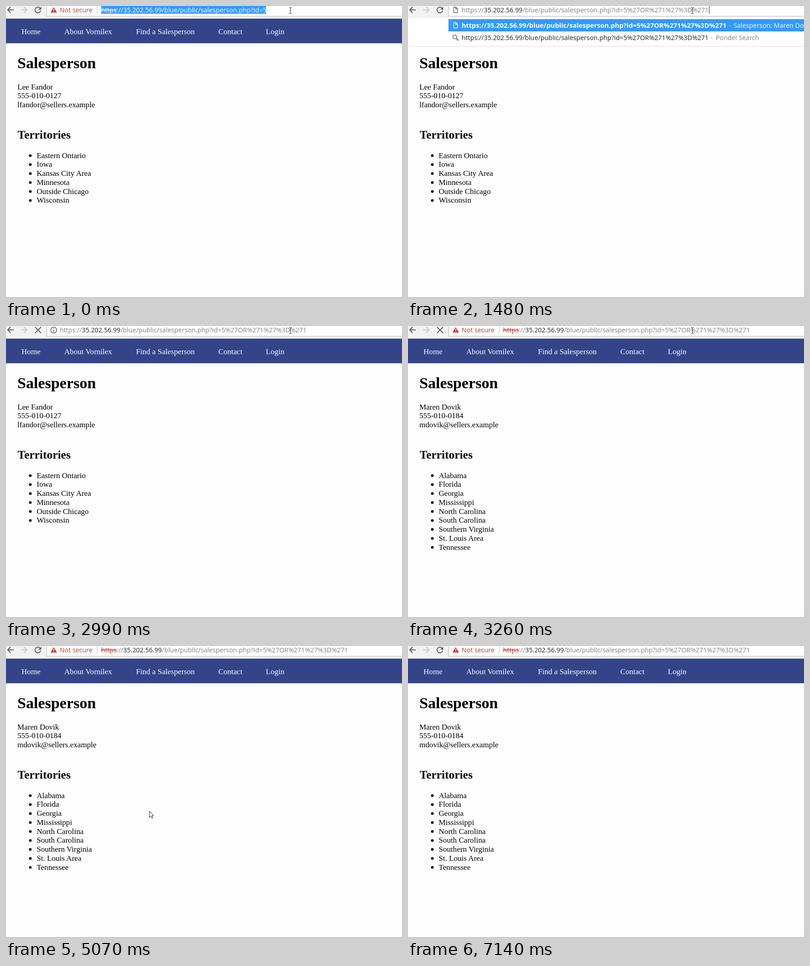
Recreate the animation shown at these times as an HTML page. Size 871 by 643 pixels, loop 7410 ms.

```html
<!DOCTYPE html>
<html lang="en">
<head>
<meta charset="utf-8">
<title>Salesperson page</title>
<style>
html, body { margin: 0; width: 100%; height: 100%; overflow: hidden; background: #fdfdfd; }
svg { display: block; width: 871px; height: 643px; }
text { white-space: pre; }
.ui { font: 14.3px "Open Sans", "Noto Sans", sans-serif; }
.page { font: 17.1px "Liberation Serif", "Noto Serif", serif; }
.bold { font-weight: bold; }
.muted { fill: #808080; }
.dark { fill: #222; }
.danger { fill: #c53929; }
.strike { text-decoration: line-through; }
.line { fill: none; stroke-width: 2; }
</style>
</head>
<body>
<svg id="stage" viewBox="0 0 871 643"></svg>
<script>
const LOOP = 7410;
const LINE = 19.75;
const HOST = "35.202.56.99";
const PATH = "/blue/public/salesperson.php?id=5";
const INJECTED = PATH + "%27OR%271%27%3D%271";

// Pointer stops: time, x, y. The pointer jumps from one to the next.
const STOPS = [
  [4120, 345, 367], [4250, 225, 467], [4400, 185, 300], [4530, 151, 122],
  [4680, 282, 260], [4800, 0, 371], [4950, 150, 470], [5070, 315, 363],
  [5190, 170, 410], [5310, 59, 369], [5460, 586, 556], [5610, 675, 630],
  [6020, 559, 575], [6160, 552, 560], [6290, 786, 522], [6440, 846, 560],
  [6720, 844, 618], [6870, 844, 629], [6990, 844, 639]
];

const rect = (x, y, w, h, fill) =>
  `<rect x="${x}" y="${y}" width="${w}" height="${h}" fill="${fill}"/>`;
const text = (x, y, content, cls = "", attrs = "") =>
  `<text x="${x}" y="${y}" class="${cls}" ${attrs}>${content}</text>`;
const span = (cls, content) => `<tspan class="${cls}">${content}</tspan>`;
const path = (d, color, attrs = "") =>
  `<path class="line" d="${d}" stroke="${color}" ${attrs}/>`;
// Content visible only in the listed time spans, e.g. "0-120 670-1200".
const during = (spans, ...content) =>
  `<g data-during="${spans}">${content.join("")}</g>`;

const url = (x, route, scheme = "muted") => text(x, 14,
  span(scheme, "https") + span("muted", "://") + span("dark", HOST) + span("muted", route), "ui");

const fileIcon = (y, color) =>
  path(`M100.5 ${y + .5}h5l3.500 3.500v8.500h-8.500zM105 ${y + .5}v4h4`, color, 'style="stroke-width:1.3"');

const notSecure =
  '<path d="M105 2.500L112 14.500H98Z" fill="#c53929"/>' +
  rect(104.2, 6.5, 1.6, 4, "#fff") + rect(104.2, 11.5, 1.6, 1.6, "#fff") +
  text(118, 14, "Not secure", "ui danger") + rect(200, 0, 1, 17, "#c4c4c4");

const reload =
  path("M75 4.800A6.300 6.300 0 1 0 76.300 10", "#5a5a5a") +
  '<path d="M77.500 1.500V8H71Z" fill="#5a5a5a"/>';

const toolbar =
  rect(0, 0, 871, 27, "#f2f2f2") + rect(0, 27, 871, 1, "#c9ccd4") +
  rect(89, 0, 782, 23, "#b5b5b5") + rect(90, 0, 781, 22, "#fff") +
  path("M17 8.500H4M10 2L3.800 8.500L10 15", "#5a5a5a") +
  path("M33 8.500H46M40 2L46.200 8.500L40 15", "#c8c8c8");

const nav = rect(0, 28, 871, 54, "#334488") + [
  [34, "Home"], [128, "About Vornilex"], [286, "Find a Salesperson"],
  [467, "Contact"], [571.5, "Login"]
].map(([x, label]) => text(x, 62, label, "page", 'fill="#fff"')).join("");

const person = (details, territories) =>
  details.map((s, i) => text(25, 183.7 + i * LINE, s, "page")).join("") +
  territories.map((s, i) =>
    `<circle cx="53.5" cy="${329.5 + i * LINE}" r="2.900"/>` +
    text(67.5, 334.5 + i * LINE, s, "page")).join("");

const suggestions =
  rect(0, 24, 871, 64, "#fff") + rect(0, 24, 89, 1, "#e2e2e2") +
  rect(0, 88, 871, 1, "#e6e6e6") + rect(0, 89, 871, 1, "#f4f4f4") +
  rect(89, 29, 782, 27, "#3399ff") + fileIcon(36, "#fff") +
  text(118, 48, "https://" + HOST + INJECTED, "ui bold", 'fill="#fff" style="font-size:14.6px"') +
  text(706, 48, "-", "ui", 'fill="#b9dcff"') +
  text(716, 48, "Salesperson: Maren Dovik", "ui", 'fill="#fff"') +
  path("M106.500 71.500L111 76", "#5a5a5a") +
  '<circle class="line" cx="103" cy="68" r="4.300" stroke="#5a5a5a" style="stroke-width:1.5"/>' +
  text(118, 74.5, "https://" + HOST + INJECTED, "ui dark") +
  text(666, 74.5, "-", "ui muted") + text(677, 74.5, "Pondel Search", "ui muted");

const infoIcon =
  '<circle class="line" cx="105" cy="9" r="6.500" stroke="#5a5a5a" style="stroke-width:1.5"/>' +
  rect(104.2, 8, 1.6, 5, "#5a5a5a") + rect(104.2, 5, 1.6, 1.7, "#5a5a5a");

const stage = document.getElementById("stage");
stage.innerHTML = [
  rect(0, 0, 871, 643, "#fdfdfd"),
  toolbar,
  nav,
  text(25, 137, "Salesperson", "page bold", 'style="font-size:34.2px"'),
  text(25.5, 291.5, "Territories", "page bold", 'style="font-size:25.5px"'),
  during("0-3260", person(
    ["Lee Fandor", "555-010-0127", "lfandor@sellers.example"],
    ["Eastern Ontario", "Iowa", "Kansas City Area", "Minnesota", "Outside Chicago", "Wisconsin"])),
  during("3260-7410", person(
    ["Maren Dovik", "555-010-0184", "mdovik@sellers.example"],
    ["Alabama", "Florida", "Georgia", "Mississippi", "North Carolina", "South Carolina",
      "Southern Virginia", "St. Louis Area", "Tennessee"])),
  rect(0, 642, 871, 1, "#888"),

  during("0-2990 3380-7410", reload),
  during("2990-3380", path("M64 2.500L77 15.500M77 2.500L64 15.500", "#5a5a5a")),
  during("0-1480 3260-7410", notSecure),
  during("0-120", rect(209, 0, 363, 17, "#3399ff"),
    text(209, 14, span("strike", "https") + "://" + HOST + PATH, "ui", 'fill="#fff"')),
  during("120-1480", url(209, PATH, "danger strike")),
  during("120-670 1200-1480", rect(572, 0, 1, 17, "#222")),
  during("1480-2990", suggestions, fileIcon(2, "#5a5a5a")),
  during("1620-2990", rect(0, 88, 871, 1, "#dedede")),
  during("1480-3260", url(118, INJECTED)),
  during("1480-2030 2590-2990", rect(662, 0, 1, 17, "#222")),
  during("2990-3260", infoIcon),
  during("3260-7410", url(209, INJECTED, "danger strike")),

  during("0-4120", path("M622.500 3.500H625M626 3.500H628.500M625.500 4V16M622.500 16.500H625M626 16.500H628.500",
    "#222", 'style="stroke-width:1"')),
  during("4120-7140", '<path id="pointer" d="M.5 .5V14.500L3.700 11.500L5.900 16.500L8 15.600L5.800 10.700H10Z" fill="#fff" stroke="#222"/>')
].join("");

const pointer = document.getElementById("pointer");
const timed = [...stage.querySelectorAll("[data-during]")].map(node => ({
  node,
  spans: node.dataset.during.split(" ").map(s => s.split("-").map(Number))
}));

function draw() {
  const t = performance.now() % LOOP;
  for (const { node, spans } of timed) {
    const shown = spans.some(([from, to]) => t >= from && t < to);
    node.style.display = shown ? "" : "none";
  }
  const [, x, y] = STOPS.filter(([time]) => time <= t).pop() || STOPS[0];
  pointer.setAttribute("transform", `translate(${x} ${y})`);
  requestAnimationFrame(draw);
}
draw();
</script>
</body>
</html>
```
